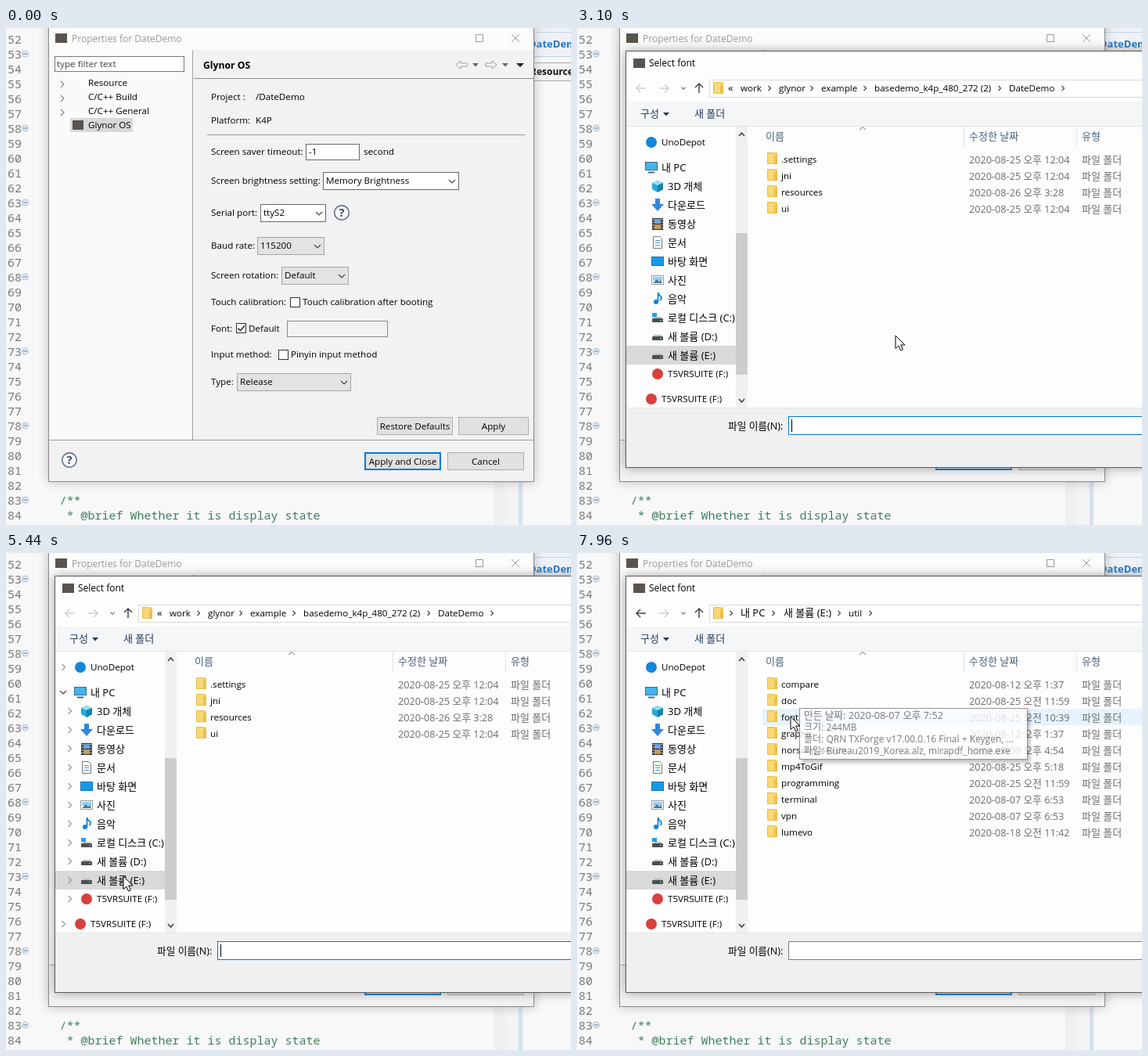
Recreate the animation shown at these times as an HTML page. Size 722 px wide and 635 px high, loop 8 s.

```html
<!DOCTYPE html>
<html lang="ko">
<head>
<meta charset="utf-8">
<title>Select font</title>
<style>
html, body { margin: 0; width: 100%; height: 100%; overflow: hidden; background: #f8f8f8; }
svg { display: block; width: 722px; height: 635px; }
text { font-family: "Open Sans", "Noto Sans CJK KR", "Noto Sans CJK", sans-serif; white-space: pre; }
.mono { font-family: "Noto Sans Mono", "DejaVu Sans Mono", monospace; }
</style>
</head>
<body>
<svg id="stage" viewBox="0 0 722 635" xmlns="http://www.w3.org/2000/svg"></svg>
<script>
const LOOP = 8000, LATIN = 11.65, KOREAN = 13, BLUE = '#0078d7';

// ---- drawing helpers: y of text is its visual middle ----
const text = (x, y, s, size = LATIN, fill = '#000', more = '') =>
  `<text x="${x}" y="${y + size * 0.36}" font-size="${size}" fill="${fill}" ${more}>${s}</text>`;
const rect = (x, y, w, h, fill, stroke, more = '') => stroke
  ? `<rect x="${x + .5}" y="${y + .5}" width="${w - 1}" height="${h - 1}" fill="${fill}" stroke="${stroke}" ${more}/>`
  : `<rect x="${x}" y="${y}" width="${w}" height="${h}" fill="${fill}" ${more}/>`;
const path = (d, stroke, width = 1, fill = 'none', more = '') =>
  `<path d="${d}" stroke="${stroke}" stroke-width="${width}" fill="${fill}" ${more}/>`;
const circle = (x, y, r, fill, stroke = 'none', width = 1) =>
  `<circle cx="${x}" cy="${y}" r="${r}" fill="${fill}" stroke="${stroke}" stroke-width="${width}"/>`;
const group = (id, body, more = '') => `<g id="${id}" ${more}>${body}</g>`;
const right = (x, y, c = '#555', r = 3) => path(`M${x - r / 2} ${y - r}l${r} ${r}l${-r} ${r}`, c, 1.2);
const down = (x, y, c = '#444', r = 4) => path(`M${x - r} ${y - r / 2}l${r} ${r}l${r} ${-r}`, c, 1.2);
const triangle = (x, y, c) => path(`M${x - 4} ${y - 2}h8l-4 4.5z`, 'none', 0, c);
const list = (items, draw) => items.map(draw).join('');

function combo(x, y, w, s, editable) {
  return rect(x, y, w, 23, editable ? '#fff' : '#e3e3e3', editable ? '#6a6a6a' : '#a5a5a5') +
    text(x + 4, y + 11, s) + down(x + w - 9, y + 12);
}
function button(x, y, w, s) {
  return rect(x, y, w, 23, '#e1e1e1', '#adadad') + text(x + w / 2, y + 11.5, s, LATIN, '#000', 'text-anchor="middle"');
}
const checkbox = (x, y) => rect(x, y, 13, 13, '#fff', '#333');
const help = (x, y) => circle(x, y, 9.3, '#f6f8fa', '#51627a', 1.4) +
  text(x, y, '?', 15, '#3d5273', 'font-weight="700" text-anchor="middle"');
const arrow = (x, y, dir, c) => path(`M${x - 6 * dir} ${y}h${12 * dir}m${-5 * dir} -5l${5 * dir} 5l${-5 * dir} 5`, c, 1.5);

// ---- editor behind the windows ----
function editor() {
  let s = rect(0, 0, 722, 635, '#f8f8f8');
  for (let n = 52; n <= 84; n++) {
    const y = 15 + (n - 52) * 19;
    s += text(2, y, n, 15, '#787878', 'class="mono"');
    if (n % 5 === 3) s += circle(24.5, y - 1, 4, '#e3edf6', '#a9bfd4') + path(`M22 ${y - 1}h5`, '#5f7f9f');
  }
  s += text(68.5, 604, '/**', 15, '#3f7f5f', 'class="mono"') +
    text(68.5, 623, ' * @brief Whether it is display state', 15, '#3f7f5f', 'class="mono"');
  s += rect(624, 0, 14, 635, '#efefef') + rect(638, 0, 17, 635, '#f4f4f4') + rect(655, 0, 5, 635, '#d5e1ee');
  s += rect(660, 0, 62, 38, '#eef2f8') + path('M660 5.5H722M660 36.5H722', '#c3cedd') +
    text(668, 20, 'DateDemo', 13, '#1f78c8', 'font-weight="700"');
  s += rect(660, 44, 62, 24, '#f3f3f3') + path('M660 44.5H722M660 67.5H722', '#a9a9a9') +
    text(670, 56, 'Resource', 12, '#111', 'font-weight="700"');
  return s;
}

// ---- properties window ----
function properties() {
  let s = rect(54, -20, 621, 600, '#888', '', 'filter="url(#blur)" opacity=".55"') +
    rect(54, -2, 621, 582, '#f2f2f2', '#8a8a8a') + rect(55, 0, 619, 28, '#fcfcfc') +
    rect(55, 28, 184, 498, '#fafafa') + rect(63, 7, 15, 12, '#59544f');
  s += group('title', text(84, 13.5, 'Properties for DateDemo', 12) +
    path('M600.5 8.5h9v9h-9zM646 8l10 10m0-10l-10 10', 'currentColor'));
  s += group('minimise', path('M555 13.5h10', '#333'));
  s += rect(62, 36, 166, 20, '#fff', '#7a7a7a') + text(65, 46, 'type filter text', LATIN, '#444');
  s += rect(82, 115, 80, 18, '#d9d9d9') + rect(85, 118, 14, 12, '#59544f');
  s += list(['Resource', 'C/C++ Build', 'C/C++ General', 'Glynor OS'], (name, i) =>
    text(105, 70 + i * 18, name) + (i < 3 ? right(72, 72 + i * 18, '#888', 4) : ''));
  s += path('M238.5 28V526M54 526.5H674', '#a0a0a0') + path('M240 64.5H674', '#8d8d8d') + path('M257 136.5H664', '#9a9a9a');
  s += text(252, 48, 'Glynor OS', 12.2, '#000', 'font-weight="700"');
  s += path('M575 47l6-5v3h8v4h-8v3zM627 47l-6-5v3h-8v4h8v3z', '#9aa0a6', 1, '#f8f8f8');
  s += triangle(600, 47, '#666') + triangle(638, 47, '#666') + path('M652 45h10l-5 5z', 'none', 0, '#222');
  const labels = [[88, 'Project :'], [118, 'Platform:'], [158, 'Screen saver timeout:'], [195, 'Screen brightness setting:'],
    [236, 'Serial port:'], [278, 'Baud rate:'], [316, 'Screen rotation:'], [350, 'Touch calibration:'],
    [384, 'Font:'], [417, 'Input method:'], [452, 'Type:']];
  s += list(labels, ([y, label]) => text(262, y, label));
  s += text(319, 88, '/DateDemo') + text(319, 118, 'K4P');
  s += rect(383, 148, 69, 21, '#fff', '#6a6a6a') + text(387, 158, '-1') + text(457, 158, 'second');
  s += combo(405, 184, 174, 'Memory Brightness', true) + combo(325, 225, 84, 'ttyS2', true) + help(429, 236) +
    combo(321, 267, 86, '115200') + combo(352, 305, 86, 'Default') + combo(295, 441, 146, 'Release');
  s += checkbox(363, 344) + text(379, 350, 'Touch calibration after booting') +
    checkbox(294, 377) + group('tick', path('M296.5 383.5l3 3.2l5.5-6.5', '#222', 1.5)) + text(310, 383.5, 'Default') +
    `<rect id="fontField" x="359.5" y="374.5" width="128" height="20"/>` +
    checkbox(348, 411) + text(364, 417, 'Pinyin input method');
  s += button(474, 497, 97, 'Restore Defaults') + button(578, 497, 90, 'Apply') +
    button(458, 542, 98, 'Apply and Close') + path('M459 543h96v21h-96z', BLUE, 2) + button(564, 542, 98, 'Cancel') + help(81, 552);
  return s;
}

// ---- file chooser ----
const folder = (x, y, faded) => `<g opacity="${faded ? .5 : 1}">` + rect(x, y - 8, 13, 15, '#f8d775') +
  rect(x + 9, y - 4, 4, 11, '#eebf4c') + path(`M${x + .5} ${y + 6.5}v-14h8l1 2h3v12z`, '#e5bc55') + '</g>';
const drive = (x, y) => rect(x - 7, y, 14, 5, '#4c4f52', '', 'rx="1"') + path(`M${x - 5} ${y - 1}h10`, '#b9bdc0', 2) +
  rect(x + 3, y + 2, 2, 1, '#5fe07a');
const icons = {
  cloud: (x, y) => circle(x, y, 7, '#1486d8'),
  pc: (x, y) => rect(x - 8, y - 7, 16, 11, '#45b4ec', '#3a6b88') + path(`M${x - 4} ${y + 6.5}h8`, '#3a6b88', 2),
  cube: (x, y) => path(`M${x} ${y - 7}l7 3v8l-7 4l-7-4v-8z`, 'none', 0, '#27a9d6') +
    path(`M${x - 7} ${y - 4}l7 3l7-3l-7-3z`, 'none', 0, '#8fe0f2') + path(`M${x} ${y - 1}l7-3v8l-7 4z`, 'none', 0, '#1780ad'),
  download: (x, y) => path(`M${x - 3} ${y - 8}h6v7h5l-8 9l-8-9h5z`, 'none', 0, '#2f86de'),
  film: (x, y) => rect(x - 7, y - 7, 14, 15, '#333') + rect(x - 4, y - 6, 8, 6, '#6fa5dc') + rect(x - 4, y + 1, 8, 6, '#c59a58') +
    path(`M${x - 5.5} ${y - 6}v13m11-13v13`, '#ddd', 1.5, 'none', 'stroke-dasharray="1.5 2"'),
  page: (x, y) => path(`M${x - 5.5} ${y - 7.5}h8l3 3v12h-11z`, '#777', 1, '#fff') +
    path(`M${x - 3} ${y - 2.5}h6m-6 3h6m-6 3h6`, '#5a8db8'),
  desktop: (x, y) => rect(x - 8, y - 6, 16, 12, '#159ae8', '#1477b6'),
  picture: (x, y) => rect(x - 8, y - 6, 16, 12, '#fff', '#999') + rect(x - 6, y - 4, 12, 5, '#8fd0f5') +
    path(`M${x - 6} ${y + 4}l5-5l3 3l2-2l2 4z`, 'none', 0, '#4b7890'),
  music: (x, y) => circle(x - 2, y + 4, 3, '#1583d5') + path(`M${x + .5} ${y + 4}v-12q1 4 4 5q1 3-1 5`, '#1583d5', 1.8),
  system: (x, y) => drive(x, y + 1) + rect(x - 7, y - 6, 6, 5, '#1ea5e8'),
  drive,
  suite: (x, y) => circle(x, y, 7, '#d8403c')
};
const places = [['cloud', 'UnoDepot', 146], ['pc', '내 PC', 178], ['cube', '3D 개체'], ['download', '다운로드'], ['film', '동영상'],
  ['page', '문서'], ['desktop', '바탕 화면'], ['picture', '사진'], ['music', '음악'], ['system', '로컬 디스크 (C:)'],
  ['drive', '새 볼륨 (D:)'], ['drive', '새 볼륨 (E:)'], ['suite', 'T5VRSUITE (F:)'], ['suite', 'T5VRSUITE (F:)', 474]]
  .map(([icon, name, top], i) => ({ icon, name, y: top || 202 + (i - 2) * 24, x: top ? 95 : 103 }));
const sizeOf = s => /[가-힣]/.test(s) ? KOREAN : LATIN;

const rowTop = i => 157 + 21 * i;
function listing(id, rows, typeX) {
  return group(id, path(`M494.5 126v26M${typeX - 6.5} 126v26`, '#e2e2e2') + text(501, 138, '수정한 날짜', KOREAN, '#4c607a') +
    text(typeX, 138, '유형', KOREAN, '#4c607a') + list(rows, ([name, date, kind], i) => {
      const y = 168 + i * 21;
      return folder(243, y - 1, kind === 'hidden') +
        (kind === 'shared' ? path(`M242 ${y + 4}q7-8 14 0`, '#3e8fcb', 3) : '') +
        text(261, y, name) + text(501, y, '2020-' + date, 12.7, '#6d6d6d') + text(typeX, y, '파일 폴더', KOREAN, '#6d6d6d');
    }));
}
const crumbs = (id, parts) => group(id, list(parts, ([x, s]) =>
  s === '›' ? right(x, 77, '#444') : text(x, 76.5, s, s === '«' ? 13 : sizeOf(s))));
const projectPath = shift => [[209, 'work'], [246, '›'], [258, 'glynor'], [300, '›'], [312, 'example'], [368, '›'],
  [380, 'basedemo_k4p_480_272 (2)'], [540, '›'], [552, 'DateDemo'], [621, '›']].map(([x, s]) => [x + shift, s]);
const drivePath = [[197, '›'], [209, '내 PC'], [251, '›'], [264, '새 볼륨 (E:)'], [335, '›']];

function chooser() {
  let s = rect(62, 29, 740, 533, '#666', '', 'filter="url(#blur)" opacity=".6"') + rect(62, 29, 740, 533, '#f0f0f0', '#5c5c5c') +
    rect(63, 30, 660, 64, '#fdfdfd') + rect(63, 94, 660, 31, '#f5f6f7') + rect(63, 125, 660, 361, '#fdfdfd') +
    path('M63 125.5H722M63 485.5H722', '#e3e3e3');
  s += rect(72, 39, 15, 12, '#59544f') + text(92, 44.5, 'Select font', 12);
  s += group('backOff', arrow(82, 77, -1, '#cfcfcf')) + group('backOn', arrow(82, 77, -1, '#444')) +
    arrow(111, 77, 1, '#cfcfcf') + down(136, 77, '#777', 2.5) + path('M156 83v-12m-5 5l5-5l5 5', '#444', 1.5);
  s += rect(169, 66, 570, 23, '#fff', '#d9d9d9') + group('crumbHover', rect(253, 67, 55, 21, '#e5f3ff', '#cce8ff') + path('M293.5 67v21', '#cce8ff'));
  s += group('crumbFolder', folder(174, 77)) + group('crumbDrive', drive(180, 77));
  s += crumbs('pathLoading', [[193, '«'], [214, '새 볼륨 (E:)'], [284, '›'], ...projectPath(84)]) +
    crumbs('pathProject', [[193, '«'], ...projectPath(0)]) + crumbs('pathDrive', drivePath) +
    crumbs('pathUtil', [...drivePath, [347, 'util'], [375, '›']]);
  s += text(81, 109, '구성', KOREAN, '#1e395b') + triangle(114, 110, '#1e395b') + text(150, 109, '새 폴더', KOREAN, '#1e395b');
  s += `<rect id="place" x="63" y="406" width="140" height="24"/>`;
  s += list(places, p => icons[p.icon](p.x, p.y) + text(p.x + 13, p.y, p.name, sizeOf(p.name)));
  s += group('expanders', list(places, (p, i) => i === 1 ? down(73, p.y, '#444') : right(p.x - 21.5, p.y, '#999', 4)));
  s += rect(203, 126, 15, 359, '#f0f0f0') + rect(203, 262, 15, 181, '#cdcdcd') +
    path('M207 138l3.5-4l3.5 4M207 474l3.5 4l3.5-4', '#444', 1.6);
  s += rect(63, 486, 660, 75, '#f0f0f0') + path('M361 130l4-3.5l4 3.5', '#777') + text(241, 138, '이름', KOREAN, '#4c607a');
  s += group('selected', rect(237, rowTop(7), 490, 21, '#d9d9d9')) + `<rect id="hover" x="237" width="490" height="21" fill="#e5f3ff"/>`;
  s += listing('listProject', [['.settings', '08-25 오후 12:04'], ['jni', '08-25 오후 12:04'],
    ['resources', '08-26 오후 3:28'], ['ui', '08-25 오후 12:04']], 645);
  s += listing('listDrive', [['$AV_ORN', '08-14 오전...', 'hidden'], ['$RECYCLE.BIN', '08-07 오후...', 'hidden'],
    ['download', '08-25 오후...'], ['repo', '07-09 오후...', 'shared'], ['System Volume Information', '07-11 오후...', 'hidden'],
    ['util', '08-25 오후...'], ['SystemImageBackup', '07-09 오후...'], ['work', '08-25 오후...']], 621);
  s += listing('listUtil', [['compare', '08-12 오후 1:37'], ['doc', '08-25 오전 11:59'], ['font', '08-25 오전 10:39'],
    ['graphic', '08-12 오후 1:37'], ['norsang_4470h', '07-09 오후 4:54'], ['mp4ToGif', '08-25 오후 5:18'],
    ['programming', '08-25 오전 11:59'], ['terminal', '08-07 오후 6:53'], ['vpn', '08-07 오후 6:53'], ['lumevo', '08-18 오전 11:42']], 645);
  s += text(193, 508, '파일 이름(N):', 12.7) + `<rect id="nameField" x="270.5" y="496.5" width="480" height="23" fill="#fff"/>` +
    group('caret', path('M274.5 500v16', '#000'));
  return s;
}

const tooltip = () => rect(287, 202, 292, 66, '#000', '', 'opacity=".3" filter="url(#soft)"') + rect(284, 198, 292, 66, '#fff', '#767676') +
  list(['만든 날짜: 2020-08-07 오후 7:52', '크기: 244MB', '폴더: QRN TXForge v17.00.0.16 Final + Keygen, ...',
    '파일: Bureau2019_Korea.alz, mirapdf_home.exe'], (s, i) => text(290, 207.5 + i * 15.2, s, i ? 12 : 12.7, '#575757'));

const stage = document.getElementById('stage');
stage.innerHTML = '<defs><filter id="blur" x="-10%" y="-10%" width="120%" height="120%"><feGaussianBlur stdDeviation="7"/></filter>' +
  '<filter id="soft"><feGaussianBlur stdDeviation="2"/></filter></defs>' +
  editor() + properties() + group('chooser', chooser()) + group('tooltip', tooltip()) +
  group('cursor', path('M0 0V16.5L3.9 13L6.5 19L9.3 17.8L6.7 12H12Z', '#000', 1, '#fff'));
const el = {};
stage.querySelectorAll('[id]').forEach(node => el[node.id] = node);

// ---- motion ----
const route = [[100, 717, 187], [460, 717, 187], [700, 600, 240], [960, 420, 340], [1240, 299, 386], [1660, 299, 386],
  [1960, 345, 392], [2440, 408, 389], [2920, 408, 389], [3100, 407, 393], [3400, 407, 393], [3500, 434, 355], [3620, 417, 290],
  [3740, 372, 263], [3860, 305, 278], [3980, 252, 312], [4080, 228, 270], [4180, 235, 192], [4320, 262, 130], [4480, 278, 79],
  [4600, 241, 82], [4760, 235, 85], [4900, 220, 110], [5040, 190, 185], [5240, 160, 330], [5440, 150, 413], [5760, 150, 413],
  [6080, 205, 365], [6400, 274, 282], [6760, 274, 282], [7120, 328, 247], [7360, 331, 243], [7500, 300, 172], [7680, 273, 209], [8000, 273, 209]];

function cursorAt(t) {
  const i = Math.max(1, route.findIndex(p => p[0] > t));
  const [a, b] = [route[i - 1], route[i]];
  const k = Math.max(0, (t - a[0]) / (b[0] - a[0]));
  return [a[1] + (b[1] - a[1]) * k, a[2] + (b[2] - a[2]) * k];
}
const show = (id, on) => el[id].setAttribute('display', on ? 'inline' : 'none');
const set = (id, attrs) => Object.entries(attrs).forEach(([k, v]) => el[id].setAttribute(k, v));

function render(t) {
  const step = Math.floor(t / 20) * 20;
  const [x, y] = cursorAt(step);
  show('cursor', t >= 100);
  set('cursor', { transform: `translate(${x} ${y})` });

  const active = t >= 1300 && t < 2440, custom = t >= 1360;
  set('title', { color: active ? '#222' : '#999' });
  el.title.firstChild.setAttribute('fill', active ? '#000' : '#999');
  show('minimise', active);
  show('tick', !custom);
  set('fontField', { fill: custom ? '#fff' : '#f2f2f2', stroke: custom ? '#333' : '#8a8a8a' });

  const opening = t < 2920;
  show('chooser', t >= 2620);
  set('chooser', opening ? { opacity: .13, transform: 'translate(20.6 10.5) scale(.96)' } : { opacity: 1, transform: '' });

  const view = t < 5680 ? 'Project' : t < 6640 ? 'Drive' : 'Util';
  ['Project', 'Drive', 'Util'].forEach(v => {
    show('list' + v, v === view);
    show('path' + v, v === view && t >= 2980);
  });
  show('pathLoading', t < 2980);
  show('crumbFolder', view !== 'Drive');
  show('crumbDrive', view === 'Drive');
  show('crumbHover', t >= 4440 && t < 4660);
  show('backOff', view === 'Project');
  show('backOn', view !== 'Project');
  show('selected', view === 'Drive');
  set('place', { fill: view === 'Drive' ? '#cce8ff' : '#d9d9d9' });
  show('expanders', t >= 5040 && t < 7240);

  const rows = { Project: 4, Drive: 8, Util: 10 }[view];
  const row = Math.floor((y - 157) / 21);
  show('hover', t >= 3400 && x >= 237 && row >= 0 && row < rows);
  set('hover', { y: rowTop(row) });

  set('nameField', { stroke: view === 'Project' ? BLUE : '#7a7a7a' });
  show('caret', view === 'Project' && (opening || (t - 2920) % 1060 < 530));
  show('tooltip', t >= 7900);
  set('tooltip', { opacity: t < 7960 ? .4 : .78 });
}

function tick(now) {
  render(now % LOOP);
  requestAnimationFrame(tick);
}
render(0);
requestAnimationFrame(tick);
</script>
</body>
</html>
```
